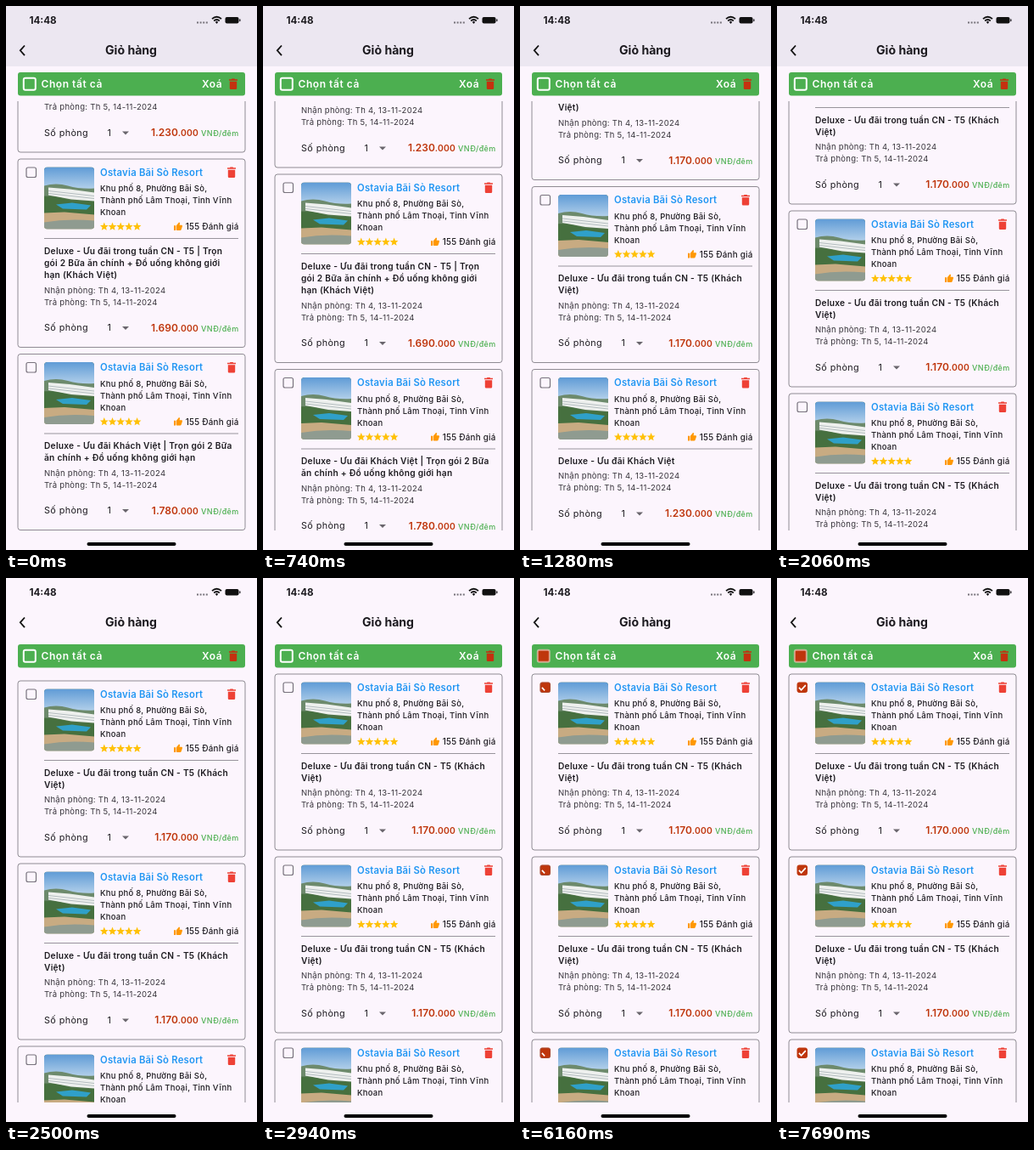
Write an HTML page that moves like this. It is 296 px wide and 640 px high and loops after 8000 ms.

```html
<!DOCTYPE html>
<html lang="vi">
<head>
<meta charset="utf-8">
<style>
  html, body { margin: 0; width: 100%; height: 100%; overflow: hidden; background: #fcf5fd; }
  svg { display: block; font-family: Inter, Roboto, sans-serif; fill: #1d1b20; }
  .clock { font-size: 11.6px; font-weight: 700; }
  .title { font-size: 14.1px; font-weight: 700; }
  .bar { font-size: 12px; font-weight: 600; letter-spacing: .55px; fill: #fff; }
  .name { font-size: 11.3px; font-weight: 600; letter-spacing: .22px; fill: #2196f3; }
  .address { font-size: 9.5px; font-weight: 500; letter-spacing: .25px; }
  .reviews { font-size: 9.8px; font-weight: 500; letter-spacing: .25px; text-anchor: end; }
  .room { font-size: 10.2px; font-weight: 600; letter-spacing: .25px; }
  .date { font-size: 9.5px; letter-spacing: .28px; fill: #37343b; }
  .count { font-size: 10.8px; letter-spacing: .4px; }
  .price { font-size: 12px; font-weight: 600; text-anchor: end; fill: #bf360c; }
  .cents { font-size: 10.3px; letter-spacing: .2px; }
  .unit { font-size: 9px; font-weight: 500; letter-spacing: .3px; fill: #4caf50; }
</style>
</head>
<body>
<svg id="stage" width="296" height="640" viewBox="0 0 296 640">
  <defs>
    <linearGradient id="sky" x2="0" y2="1">
      <stop stop-color="#5f9bd6"/><stop offset="1" stop-color="#b3d0ea"/>
    </linearGradient>
    <clipPath id="listClip"><rect y="112" width="296" height="505"/></clipPath>
    <clipPath id="photoClip"><rect width="59" height="73" rx="4"/></clipPath>
    <path id="trash" d="M.8 3.2H9.2V11.2Q9.2 12.5 7.9 12.5H2.1Q.8 12.5 .8 11.2ZM0 .8H2.8L3.5 0H6.5L7.2 .8H10V2.3H0Z"/>
    <path id="star" d="M0-4.9 1.4-1.6 4.8-1.4 2.2.9 3 4.2 0 2.4-3 4.2-2.2.9-4.8-1.4-1.4-1.6Z"/>
    <path id="thumb" d="M0 4.2H2V10H0ZM2.7 4.5 6 .4Q7.3.5 7 2L6.6 3.7H9Q10.2 3.8 10 5L8.7 9Q8.4 10 7.3 10H3.7Q2.7 10 2.7 9Z"/>
    <g id="photo" clip-path="url(#photoClip)">
      <rect width="59" height="73" fill="#4f7348"/>
      <rect width="59" height="26" fill="url(#sky)"/>
      <path d="M0 22Q14 18 28 22T59 25V34H0Z" fill="#6d8a6c"/>
      <path d="M5 24 30 26 59 30V40L32 38 5 33Z" fill="#eef0ee"/>
      <path d="M5 28 59 34M5 31 59 37" stroke="#b4bdc0"/>
      <path d="M0 35Q18 34 32 40L59 41V56H0Z" fill="#46703f"/>
      <path d="M14 44 33 42 55 45 50 50 22 49Z" fill="#2fa0c9"/>
      <path d="M0 54 24 53 59 56V73H0Z" fill="#c8ab82"/>
      <path d="M0 65Q28 60 59 63V73H0Z" fill="#8f9b90"/>
    </g>
  </defs>

  <g clip-path="url(#listClip)"><g id="list"></g></g>

  <rect id="tint" width="296" height="71" fill="#ece7f1"/>
  <text class="clock" x="27.500" y="21">14:48</text>
  <path d="M225 19.5H238" stroke="#77737b" stroke-width="2" stroke-dasharray="2 1.6"/>
  <g fill="none" stroke="#111" stroke-width="1.8">
    <path d="M243 15.2Q248.500 10.200 254 15.2M245.200 17.500Q248.500 14.500 251.800 17.500"/>
    <path d="M22 46.500 16.800 52.300 22 58.100"/>
  </g>
  <path d="M246.800 19 248.500 17.500 250.200 19 248.500 21Z"/>
  <rect x="258.500" y="13" width="16" height="7.500" rx="2" fill="#111"/>
  <rect x="275.200" y="15.200" width="1.300" height="3" rx=".6"/>
  <text class="title" x="117" y="57">Giỏ hàng</text>
  <rect x="14" y="78" width="268" height="27.500" rx="3" fill="#4caf50"/>
  <text class="bar" x="41.500" y="96">Chọn tất cả</text>
  <text class="bar" x="231" y="96">Xoá</text>
  <use href="#trash" x="263" y="85.500" fill="#c4310f"/>
  <g id="selectAll"></g>
  <rect x="95.500" y="631" width="105" height="4" rx="2" fill="#000"/>
</svg>
<script>
const $ = id => document.getElementById(id);
const text = (cls, x, y, s) => `<text class="${cls}" x="${x}" y="${y}">${s}</text>`;

const checkbox = (x, y, size, color, line) => {
  const box = `x="${x}" y="${y}" width="${size}" height="${size}" rx="2"`;
  const k = size / 12;
  return `<g class="check">
    <rect ${box} fill="#bf360c" stroke="#bf360c"/>
    <rect ${box} fill="none" stroke="${color}" stroke-width="${line}"/>
    <path d="M${x + 2 * k} ${y + 6.2 * k}l${2.8 * k} ${2.9 * k} ${5.4 * k} ${-5.9 * k}" fill="none"
      stroke="#fff" stroke-width="1.7" pathLength="1" stroke-dasharray="1 2"/></g>`;
};

const midweek = ['Deluxe - Ưu đãi trong tuần CN - T5 (Khách', 'Việt)'];
const rooms = [
  [midweek, '1.170'], [midweek, '1.170'], [midweek, '1.170'],
  [['Deluxe - Ưu đãi Khách Việt'], '1.230'],
  [['Deluxe - Ưu đãi trong tuần CN - T5 | Trọn', 'gói 2 Bữa ăn chính + Đồ uống không giới', 'hạn (Khách Việt)'], '1.690'],
  [['Deluxe - Ưu đãi Khách Việt | Trọn gói 2 Bữa', 'ăn chính + Đồ uống không giới hạn'], '1.780'],
];
const address = ['Khu phố 8, Phường Bãi Sò,', 'Thành phố Lâm Thoại, Tỉnh Vĩnh', 'Khoan'];

const card = (y, height, lines, price) => {
  const end = height - 207;
  return `<g transform="translate(0 ${y})">
    <rect x="14" y="0" width="268" height="${height}" rx="3" fill="none" stroke="#8f8b93"/>
    ${checkbox(24, 10, 11.5, '#77727c', 1.2)}
    <use href="#photo" x="45" y="9.5"/>
    ${text('name', 111, 19.7, 'Ostavia Bãi Sò Resort')}
    <use href="#trash" x="261" y="9.5" fill="#ee4136"/>
    ${address.map((s, i) => text('address', 111, 38 + 14 * i, s)).join('')}
    ${[0, 1, 2, 3, 4].map(i => `<use href="#star" x="${115.8 + 9.7 * i}" y="79.5" fill="#ffc107"/>`).join('')}
    <use href="#thumb" x="198" y="74" fill="#ff9800"/>
    ${text('reviews', 274.5, 83, '155 Đánh giá')}
    <path d="M45 93.500H274" stroke="#98949c"/>
    ${lines.map((s, i) => text('room', 45, 111.5 + 14.4 * i, s)).join('')}
    ${text('date', 45, 143.4 + end, 'Nhận phòng: Th 4, 13-11-2024')}
    ${text('date', 45, 157.3 + end, 'Trả phòng: Th 5, 14-11-2024')}
    ${text('count', 45, 187.7 + end, 'Số phòng')}
    ${text('count', 119.5, 187.7 + end, '1')}
    <path d="M137 ${182.5 + end}h8l-4 4z" fill="#6a666d"/>
    ${text('price', 274.5, 188 + end, `${price}<tspan class="cents">.000</tspan> <tspan class="unit">VNĐ/đêm</tspan>`)}
  </g>`;
};

let cardY = 113;
$('list').innerHTML = rooms.map(([lines, price]) => {
  const height = 207 + 14.5 * (lines.length - 2);
  const html = card(cardY, height, lines, price);
  cardY += height + 8;
  return html;
}).join('');
$('selectAll').innerHTML = checkbox(20.8, 84.8, 14, '#fff', 2);

// Each track is a list of [time, value]; a value holds until the next time.
const scrollTrack = [
  [0, 778.5], [500, 774], [600, 769], [740, 760.5], [850, 650], [960, 540], [1060, 450], [1170, 380],
  [1280, 330.5], [1430, 300], [1530, 292], [1940, 200], [2060, 87], [2170, 5],
  [2280, -34], [2390, -20], [2500, -8], [2620, -3.5], [2730, -1.5], [2830, -.7], [2940, 0],
];
const headerTint = [[0, 1], [2280, .6], [2390, 0]];
const allChecked = [
  [0, 0], [4210, .17], [4320, .33], [4430, .5], [4540, 1],
  [6160, .5], [6270, .33], [6380, .17], [6490, 0], [7470, .17], [7580, .33], [7690, .5],
];
const cardsChecked = [
  [0, 0], [4210, .3], [4320, .7], [4430, 1],
  [6160, .7], [6270, .3], [6380, 0], [7470, .3], [7580, .7], [7690, 1],
];
const valueAt = (track, t) => track.findLast(([time]) => time <= t)[1];

// First half fades the fill in, second half draws the tick.
const setCheck = (el, p) => {
  const [fill, border, tick] = el.children;
  fill.setAttribute('opacity', Math.min(1, 2 * p));
  border.setAttribute('opacity', 1 - p);
  tick.setAttribute('opacity', p > .5 ? 1 : 0);
  tick.setAttribute('stroke-dashoffset', 1 - Math.max(0, 2 * p - 1));
};

const cardChecks = $('list').querySelectorAll('.check');
const headCheck = $('selectAll').firstElementChild;

const draw = () => {
  const t = performance.now() % 8000;
  $('list').setAttribute('transform', `translate(0 ${-valueAt(scrollTrack, t)})`);
  $('tint').setAttribute('opacity', valueAt(headerTint, t));
  setCheck(headCheck, valueAt(allChecked, t));
  cardChecks.forEach(el => setCheck(el, valueAt(cardsChecked, t)));
  requestAnimationFrame(draw);
};
draw();
</script>
</body>
</html>
```
